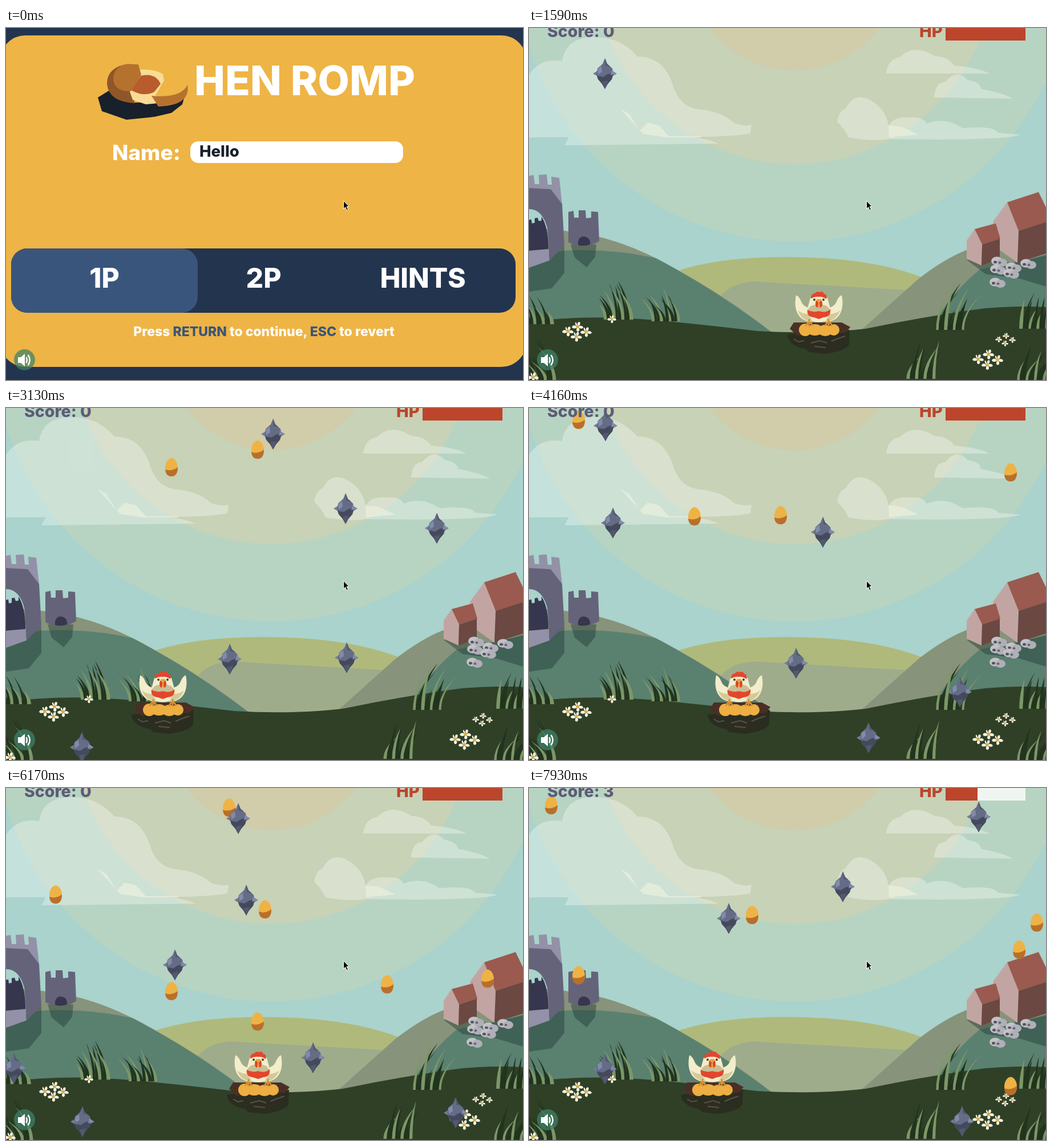
Recreate the animation shown at these times as an HTML page. Size 906 by 618 pixels, loop 8000 ms.

```html
<!DOCTYPE html>
<html lang="en">
<head>
<meta charset="utf-8">
<title>Hen Romp</title>
<style>
html, body { margin: 0; width: 100%; height: 100%; overflow: hidden; background: #23344f; }
svg { display: block; width: 906px; height: 618px; }
text { font-family: Inter, "Open Sans", sans-serif; font-weight: 800; }
</style>
</head>
<body>
<svg viewBox="0 0 906 618">
<defs>
  <g id="mine">
    <path fill="#737c99" d="M-21 0-11-6-11 6ZM21 0 11-6 11 6Z"/>
    <path fill="#656c86" d="M0-27-4-17-13-9-15 0-12 10-5 18 0 27 5 18 12 10 15 0 13-9 4-17Z"/>
    <path fill="#444a5c" d="M-14 4-3 6 5 1 15-1 12 10 5 18 0 27-5 18-12 10Z"/>
    <path fill="#828bab" d="M-13-8-6-13-5-3-12 2ZM12-6 20 0 10 3Z"/>
    <path fill="#525970" d="M0-27 4-17 10-12 1-14ZM-5 14 6 12 0 27Z"/>
  </g>
  <g id="egg">
    <path fill="#eeb344" d="M-11 1C-11-9-5-16 0-16S11-9 11 1 6 16 0 16-11 11-11 1Z"/>
    <path fill="#b96f2c" d="M-11 4Q0 8 11 0 11 16 0 16-10 16-11 4Z"/>
  </g>
  <g id="flower">
    <path fill="#f7f3e4" d="M0-2Q-1-9 4-8 6-4 2-1 9-3 10 2 7 5 2 2 5 7 1 9-4 8-1 2-8 5-10 1-8-4-2-1-6-6-3-8Z"/>
    <circle r="2.8" fill="#d9ac45"/>
  </g>
  <g id="stone">
    <ellipse rx="10" ry="7.5" cx="-4" cy="-1" fill="#c3c1c8"/>
    <ellipse rx="9" ry="7" cx="5" cy="2" fill="#b0afb8"/>
    <ellipse rx="3" ry="2.5" cx="-7" cy="1" fill="#55565f"/>
    <ellipse rx="2.4" ry="2" cx="1" cy="2" fill="#62636c"/>
  </g>
  <g id="wing">
    <path fill="#f2edca" d="M-40 469Q-34 472-31 480-27 491-12 492L-6 515Q-28 518-37 502-44 489-40 469Z"/>
    <path fill="#d6c998" d="M-37 496Q-28 503-15 502L-10 515Q-29 516-37 496Z"/>
    <path fill="none" stroke="#d98f2b" stroke-width="3" d="M-17 511V518M-23 523Q-21 517-17 517T-11 523M-17 517V524"/>
  </g>
</defs>

<g id="game">
  <path fill="#a9d3cc" d="M0 0H906V618H0Z"/>
  <circle cx="465" cy="-111" r="486" fill="#b7d4c2"/>
  <circle cx="465" cy="-111" r="350" fill="#c7d2b6"/>
  <circle cx="465" cy="-111" r="185" fill="#d1cca9"/>
  <g fill="#fff" opacity=".32">
    <path d="M0 82Q20 52 58 58 64 18 110 16 160 14 190 50 236 50 252 100 264 140 300 143 336 146 360 167 376 173 390 170L388 185Q350 192 270 191L0 192Z"/>
    <path d="M62 206 78 176Q95 156 120 163 150 128 176 150 225 162 240 190 300 188 332 203Z"/>
    <path d="M626 80Q628 55 650 51 675 26 710 49 735 50 745 66 790 70 806 80Z"/>
    <path d="M710 122Q712 95 729 95 750 70 768 91 790 94 792 107 830 114 848 124Z"/>
    <path d="M540 165Q543 145 555 141 570 112 597 126 626 142 630 172 640 154 668 157 690 155 697 168 730 155 760 176 815 171 822 184L862 187Q840 198 630 195 600 200 560 192 552 175 540 165Z"/>
  </g>
  <path fill="#f1f3df" opacity=".6" d="M630 171 652 173 682 187 631 192ZM160 142 176 151 194 180 208 166 228 171 245 190H302V192H240L200 186Z"/>

  <path fill="#b0b97c" d="M255 428Q330 402 450 402 600 402 695 440L640 545H330Z"/>
  <path fill="#9eac8c" d="M330 478Q350 447 395 445 520 452 660 460L585 540H420Z"/>
  <path fill="#87937a" d="M0 350 62 356Q160 365 262 426 350 474 425 534H0ZM578 534 683 440Q735 400 775 387L906 395V534Z"/>
  <path fill="#5a8070" d="M0 402 60 391Q140 386 222 404 320 455 425 534H0ZM705 534Q725 478 790 424L906 400V534Z"/>

  <path fill="#1d3530" opacity=".42" d="M0 421 62 383V430L40 457 0 463ZM73 380H118L116 402 101 420 80 403ZM767 407 856 412 906 398V454L860 440 800 432Z"/>
  <path fill="#9391a8" d="M-2 260 8 258 10 274 18 274 17 258 31 257 33 275 40 275 39 261 53 263 58 310 38 290 0 284ZM0 387 34 388 36 408 0 421Z"/>
  <path fill="#64637a" d="M0 281 38 283 58 309 62 382 36 408 33 355Q25 318 0 318ZM69 323 78 321 79 333 87 333 87 320 99 320 100 334 109 333 109 322 121 323 123 374Q112 382 95 382 78 382 69 376Z"/>
  <path fill="#36364f" d="M0 337 4 336 5 343 10 342 10 334 15 333 17 339 22 338 22 331Q34 350 34 388L0 391ZM86 381V375Q88 366 96 366 106 367 107 376V380Q96 384 86 381Z"/>

  <path fill="#c2a5a2" d="M813 340 838 306 858 355 856 412 825 390ZM767 373 781 353 794 380 793 417 767 405Z"/>
  <path fill="#9a5a4f" d="M838 306 893 288 906 315V342L858 356ZM781 353 818 343 826 370 794 380Z"/>
  <path fill="#6b4842" d="M858 356 906 341V396L856 412ZM794 380 825 370V405L793 417Z"/>
  <g id="stones"></g>

  <path fill="#2f4027" d="M0 516Q100 502 222 513 300 520 400 532 500 538 590 528 700 505 800 492 860 487 906 490V618H0Z"/>
  <g id="plants"></g>
  <g id="items"></g>

  <g id="hen">
    <path fill="#2a2d1f" d="M-55 538Q-54 558-22 564L-18 569 10 572Q44 568 53 556L54 530Z"/>
    <path fill="#4a2f25" d="M-51 528-44 517H40L55 525 47 535-38 540Z"/>
    <path fill="none" stroke="#5d5046" stroke-width="2" d="M-44 546-36 551-26 549M-14 553 2 549 14 553M22 550 34 545 46 541M-8 559 12 561"/>
    <g fill="#edae42">
      <circle cx="-24" cy="530" r="11"/><ellipse cx="-7" cy="530" rx="14" ry="10"/>
      <ellipse cx="11" cy="531" rx="13" ry="10"/><circle cx="26" cy="530" r="10"/>
    </g>
    <use href="#wing"/><use href="#wing" transform="scale(-1 1)"/>
    <path fill="#f2edca" d="M-15 474Q0 466 15 474L21 496 12 514Q0 519-12 514L-21 496Z"/>
    <path fill="#cbbd93" d="M-14 488Q0 482 14 488L21 496Q0 506-21 496Z"/>
    <path fill="#e2472d" d="M-20 495Q-10 500 0 497 12 501 20 494 22 507 8 508L0 511-9 508Q-22 507-20 495ZM-14 475Q-14 466-7 466-4 461 1 464 7 461 9 467 15 467 13 476 6 471 0 472-7 471-14 475Z"/>
    <path fill="#e9a13a" d="M-4 476H4L3 487 0 491-3 487Z"/>
    <path fill="#d8432b" d="M-5 478Q-8 490-2 491L-1 482ZM5 478Q8 490 2 491L1 482Z"/>
    <circle cx="-8" cy="477" r="2" fill="#4b3d2c"/><circle cx="8" cy="477" r="2" fill="#4b3d2c"/>
  </g>

  <text id="score" x="32" y="15.500" font-size="28.500" fill="#5d5c78"></text>
  <text x="684" y="15.500" font-size="29" fill="#bc452c">HP</text>
  <path fill="#f1f5f2" d="M730 0H870V22H730Z"/>
  <rect id="hp" x="730" width="140" height="22" fill="#bc452c"/>
</g>

<g id="menu">
  <path fill="#23344f" d="M0 0H906V618H0Z"/>
  <rect x="-10" y="13" width="922" height="582" rx="44" fill="#eeb445"/>
  <path fill="#17202b" d="M161 122 182 109 226 131 300 128 313 120 309 134 290 149 260 156 211 161 168 146Z"/>
  <path fill="#8f5727" d="M215 63Q177 68 177 98 180 130 226 132L216 106 200 70Z"/>
  <path fill="#f8dc95" d="M234 73Q262 72 275 81L277 92 262 118 266 132 245 134 222 126 216 109Z"/>
  <path fill="#b85b2d" d="M236 84Q262 78 271 98L260 112Q242 122 219 109Z"/>
  <path fill="#b5722f" d="M188 90Q188 68 213 63L232 64 237 82 219 111Q190 112 188 90ZM255 119Q306 124 318 100 324 136 267 138Z"/>
  <g fill="#fff">
    <text x="330" y="118" font-size="72">HEN ROMP</text>
    <text x="186" y="232" font-size="37">Name:</text>
    <rect x="323" y="199" width="373" height="38" rx="14"/>
  </g>
  <text x="339" y="225.500" font-size="27.500" fill="#17202b">Hello</text>
  <rect x="9" y="387" width="884" height="113" rx="28" fill="#23344f"/>
  <rect x="9" y="387" width="327" height="113" rx="28" fill="#3a557b"/>
  <g fill="#fff" text-anchor="middle" font-size="48">
    <text x="172.500" y="456">1P</text>
    <text x="451.500" y="456">2P</text>
    <text x="730.500" y="456">HINTS</text>
    <text x="452" y="541" font-size="23">Press <tspan fill="#3a557b">RETURN</tspan> to continue, <tspan fill="#3a557b">ESC</tspan> to revert</text>
  </g>
</g>

<circle cx="32.500" cy="582.500" r="18.500" fill="#3f8268" opacity=".73"/>
<path fill="#fff" d="M21 578H26L33 572V594L26 588H21Z"/>
<path fill="none" stroke="#fff" stroke-width="2.500" d="M35.500 578Q38 583 35.500 588M38.500 574Q45 583 38.500 592"/>
<path stroke="#fff" stroke-width="1" d="M591.500 303.500V317.500L594.500 314.500 597 320 599.500 319 597 313.500H601Z"/>
</svg>

<script>
const $ = id => document.getElementById(id);

function add(parent, tag, attrs) {
  const el = document.createElementNS("http://www.w3.org/2000/svg", tag);
  for (const k in attrs) el.setAttribute(k, attrs[k]);
  return parent.appendChild(el);
}
const stamp = (parent, id, x, y, s = 1) =>
  add(parent, "use", { href: "#" + id, transform: `translate(${x} ${y}) scale(${s})` });

let seed = 7;
const rand = () => (seed = seed * 16807 % 2147483647) / 2147483647;

function tuft(x, y, height, lean) {
  for (let i = 0; i < 10; i++) {
    const bx = x + (i - 4.5) * 5, h = height * (.4 + .6 * rand()), b = 2 + 1.5 * rand();
    add($("plants"), "path", {
      fill: i % 3 ? "#22341d" : "#7c9768",
      d: `M${bx - b} ${y}q0 ${-h / 2} ${b + lean * (.4 + rand())} ${-h}Q${bx + b} ${y - h / 2} ${bx + b} ${y}Z`
    });
  }
}
tuft(157, 512, 72, -18);
tuft(240, 515, 66, -18);
tuft(18, 520, 52, -14);
tuft(738, 530, 88, 24);
tuft(885, 528, 68, 14);
tuft(687, 616, 70, 16);
tuft(22, 620, 80, -22);
tuft(880, 618, 80, 22);

// n flowers on a flat ring
function flowers(x, y, n, rx, size) {
  for (let i = 0; i < n; i++) {
    const a = i / n * 2 * Math.PI - 1.5;
    stamp($("plants"), "flower", x + rx * Math.cos(a), y + rx * .55 * Math.sin(a), size);
  }
}
flowers(84, 533, 4, 16, 1);
flowers(804, 582, 4, 17, 1);
flowers(835, 547, 4, 12, .6);
flowers(145, 511, 1, 0, .8);
flowers(7, 613, 1, 0, 1);

for (const [x, y] of [[824, 410], [822, 424], [849, 420], [845, 431], [875, 414], [821, 447]])
  stamp($("stones"), "stone", x, y);

// the game slows a little towards the end
const clock = t => t - 8e-6 * Math.max(0, t - 4500) ** 2;

const stops = [[2140, 508], [2890, 275], [3400, 275], [3900, 368],
  [5300, 368], [5900, 442], [7560, 442], [7780, 321]];
const henX = t => stops.slice(1).reduce((x, [end, to], i) => {
  const [start, from] = stops[i];
  return x + (to - from) * Math.max(0, Math.min(1, (t - start) / (end - start)));
}, stops[0][1]);

// lanes as [x, speed]; one item falls per period
const items = [];
function rain(kind, first, period, lanes) {
  lanes.forEach(([x, v], i) => {
    const born = clock(first + i * period);
    const y = t => v * .0279 * (clock(t) - born) - 30;
    let hit = 0;
    while (hit < 8000 && !(Math.abs(x - henX(hit)) < 50 && y(hit) > 462 && y(hit) < 540)) hit += 10;
    items.push({ kind, x, y, hit, el: stamp($("items"), kind, x, -99) });
  });
}
rain("egg", 1530, 675, [[290, 3], [441, 4], [844, 4], [87, 3], [668, 7],
  [454, 7], [391, 4], [859, 7], [890, 10], [39, 7]]);
rain("mine", 1262, 335, [[133, 12], [392, 11], [597, 14], [755, 10], [595, 14],
  [468, 14], [515, 10], [147, 15], [134, 10], [14, 10], [788, 14], [538, 15], [296, 14],
  [421, 15], [407, 14], [759, 14], [133, 15], [350, 10], [550, 12], [788, 10]]);

function draw(t) {
  $("menu").style.display = t < 950 ? "" : "none";
  for (const { x, y, hit, el } of items) {
    el.style.display = t < hit ? "" : "none";
    el.setAttribute("transform", `translate(${x} ${y(t).toFixed(1)})`);
  }
  const hits = kind => items.filter(it => it.kind === kind && t >= it.hit).length;
  $("score").textContent = "Score: " + hits("egg");
  $("hp").setAttribute("width", 140 * (1 - .3 * hits("mine")));
  $("hen").setAttribute("transform", `translate(${henX(t).toFixed(1)} 0)`);
}

function loop() {
  draw(performance.now() % 8000);
  requestAnimationFrame(loop);
}
loop();
</script>
</body>
</html>
```
